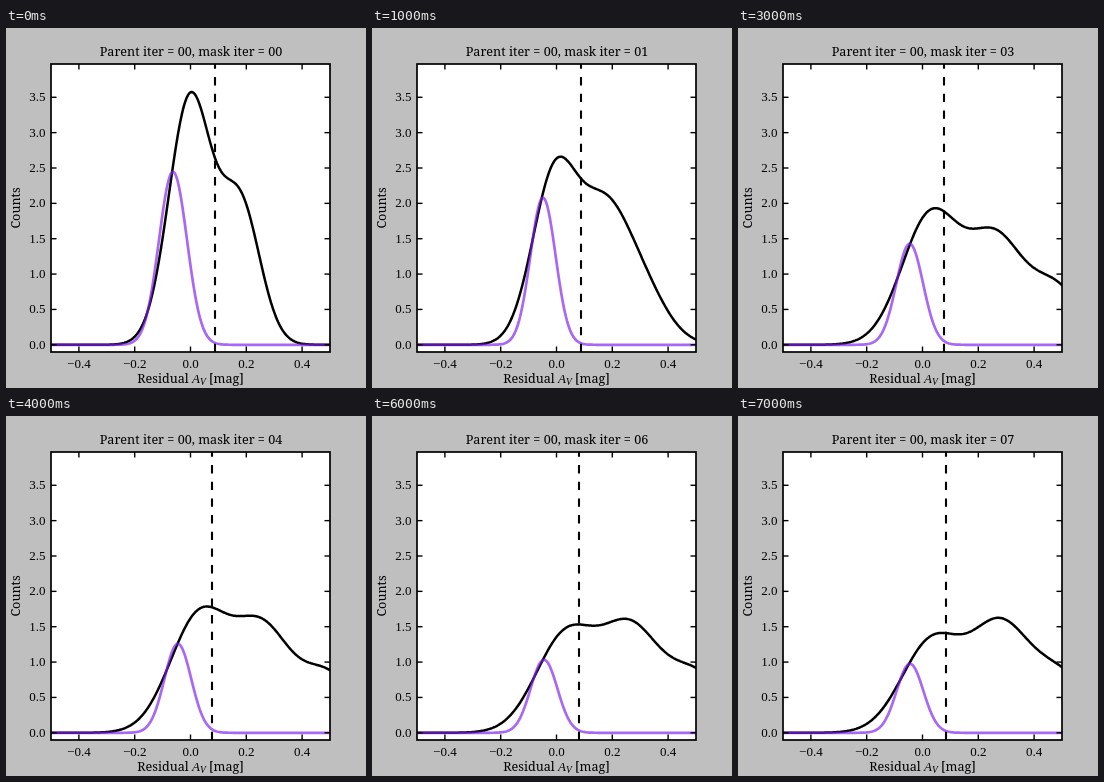
Animation, 360 px wide and 360 px high, one loop 8 s. Source, as an HTML page:

```html
<!DOCTYPE html>
<html lang="en">
<head>
<meta charset="utf-8">
<title>Residual distribution</title>
<style>
html, body { margin: 0; width: 100%; height: 100%; overflow: hidden; background: #bfbfbf; }
svg { display: block; width: 100vw; height: 100vh; }
text { font: 12.6px "Noto Serif", serif; }
.tick { font: 13px "Liberation Serif", serif; }
.math { font: italic 13px "Liberation Serif", serif; }
.sub { font-size: 9.5px; }
.mid { text-anchor: middle; }
.end { text-anchor: end; }
path, line { fill: none; stroke: #000; stroke-linejoin: round; }
</style>
</head>
<body>
<svg viewBox="0 0 360 360">
  <clipPath id="area"><rect x="45" y="36" width="279" height="288"/></clipPath>
  <rect x="45" y="36" width="279" height="288" fill="#fff"/>
  <g clip-path="url(#area)">
    <path id="total" stroke-width="2.5"/>
    <path id="bell" style="stroke:#8020f0;stroke-opacity:.68" stroke-width="2.7"/>
    <line id="cut" y1="324" y2="36" stroke-width="2.1" stroke-dasharray="8.33"/>
  </g>
  <g id="axes" stroke-width="1.4"></g>
  <rect x="45" y="36" width="279" height="288" fill="none" stroke="#000" stroke-width="1.7"/>
  <text id="title" class="mid" x="185" y="28"></text>
  <text class="mid" x="184.5" y="355">Residual <tspan class="math">A</tspan><tspan class="math sub" dy="2">V</tspan><tspan dy="-2"> [mag]</tspan></text>
  <text class="mid" transform="translate(14 180) rotate(-90)">Counts</text>
</svg>
<script>
const $ = id => document.getElementById(id);
const STEP = 1000, STEPS = 8, LEFT = 45, RIGHT = 324, BASE = 316.8;

// Each bump is [height, centre, sigma] in pixels; the black curve is the sum of three.
const keys = [
  { at: 0, cut: 209, bell: [173, 167, 14], sum: [[246, 184, 21.2], [140, 234, 20], [0, 262, 27]] },
  { at: 1, cut: 209, bell: [147, 171, 12.6], sum: [[170, 183, 22.5], [102, 229, 23], [68, 263, 27]] },
  { at: 2, cut: 208, bell: [114, 171.5, 13], sum: [[147, 193.5, 29.5], [111, 258, 24], [36, 312, 28]] },
  { at: 3, cut: 206, bell: [101, 171.7, 13.4], sum: [[130, 193, 29], [101, 258, 27], [56, 318, 26]] },
  { at: 5, cut: 206, bell: [77, 172, 13.4], sum: [[104, 194.5, 30], [95, 255, 28], [60, 325, 30]] },
  { at: 7, cut: 208, bell: [69, 172, 13.4], sum: [[92, 194.5, 30.5], [97, 261, 28], [58, 322, 32]] }
];

const mix = (a, b, t) => Array.isArray(a) ? a.map((v, i) => mix(v, b[i], t)) : a + (b - a) * t;

function pose(step) {
  const n = Math.max(1, keys.findIndex(k => k.at >= step));
  const a = keys[n - 1], b = keys[n], t = (step - a.at) / (b.at - a.at);
  return { cut: mix(a.cut, b.cut, t), bell: mix(a.bell, b.bell, t), sum: mix(a.sum, b.sum, t) };
}

const gauss = (x, [height, mid, sigma]) => height * Math.exp(-(((x - mid) / sigma) ** 2) / 2);

function curve(bumps) {
  const points = [];
  for (let x = LEFT; x <= RIGHT + 1; x++) {
    const y = bumps.reduce((y, bump) => y - gauss(x, bump), BASE);
    points.push(`${x} ${y.toFixed(2)}`);
  }
  return "M" + points.join("L");
}

function drawAxes() {
  let out = "";
  const tick = (x, y, dx, dy) => out += `<path d="M${x} ${y}l${dx} ${dy}"/>`;
  const label = (x, y, cls, s) =>
    out += `<text class="tick ${cls}" x="${x}" y="${y}">${s.replace("-", "\u2212")}</text>`;
  for (let i = -2; i <= 2; i++) {
    const x = 184.5 + i * 55.8;
    tick(x, 324, 0, -5.5);
    tick(x, 36, 0, 5.5);
    label(x, 340, "mid", (i * .2).toFixed(1));
  }
  for (let i = 0; i <= 7; i++) {
    const y = BASE - i * 35.36;
    tick(LEFT, y, 5.5, 0);
    tick(RIGHT, y, -5.5, 0);
    label(39.5, y + 4, "end", (i / 2).toFixed(1));
  }
  $("axes").innerHTML = out;
}

let shown = -1;

function draw(now) {
  const step = Math.floor(now / STEP) % STEPS;
  if (step === shown) return;
  shown = step;
  const { cut, bell, sum } = pose(step);
  $("total").setAttribute("d", curve(sum));
  $("bell").setAttribute("d", curve([bell]));
  $("cut").setAttribute("x1", cut);
  $("cut").setAttribute("x2", cut);
  $("title").textContent = `Parent iter = 00, mask iter = 0${step}`;
}

drawAxes();
draw(0);
let start;
requestAnimationFrame(function loop(now) {
  start ??= now;
  draw(now - start);
  requestAnimationFrame(loop);
});
</script>
</body>
</html>
```
